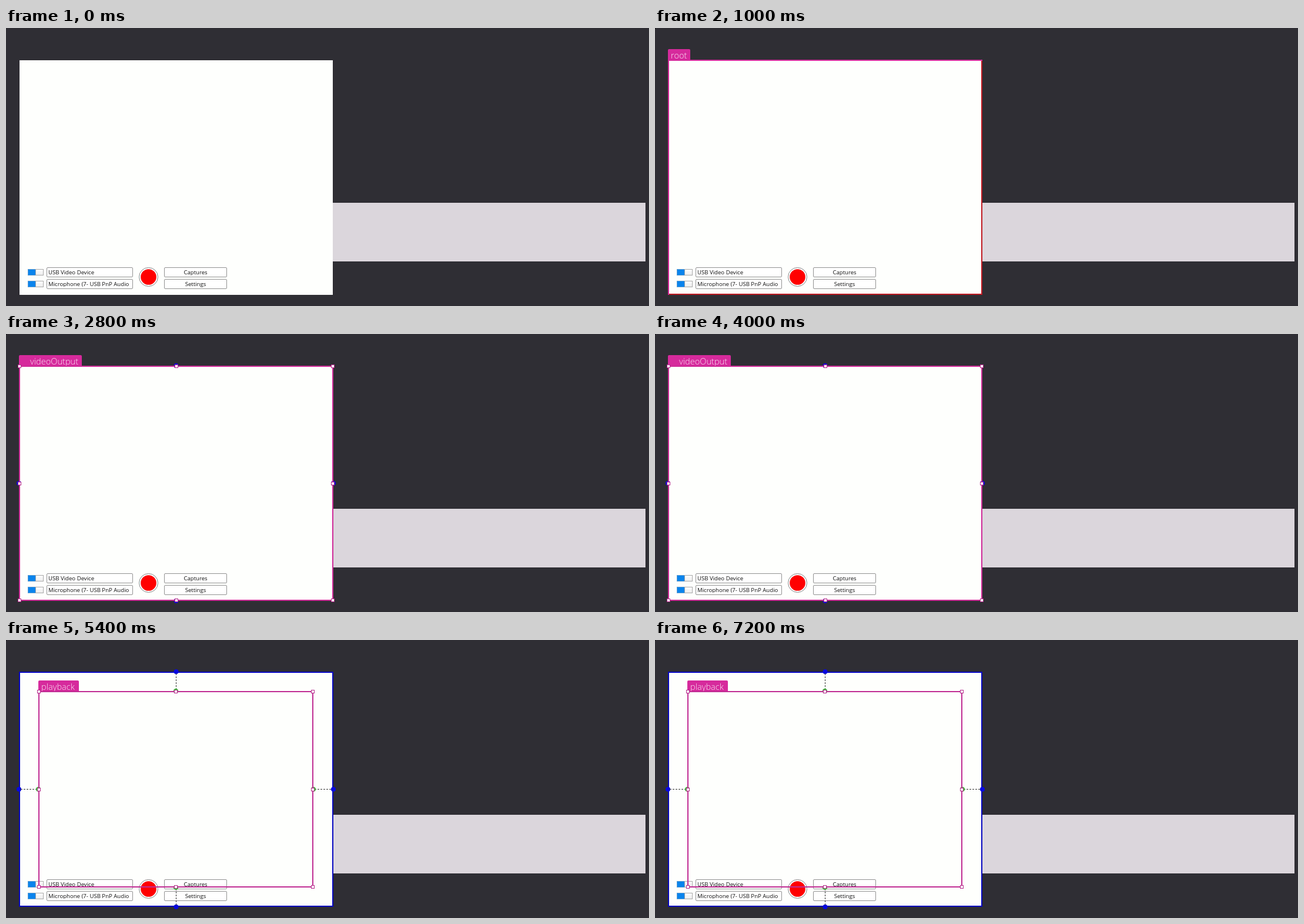
Recreate the animation shown at these times as an HTML page. Size 1094x474 px, loop 8000 ms.

```html
<!DOCTYPE html>
<html lang="en">
<head>
<meta charset="utf-8">
<title>Form editor selection</title>
<style>
  html, body { margin: 0; width: 100%; height: 100%; overflow: hidden; background: #2f2e34; }
  svg { display: block; width: 1094px; height: 474px; font-family: "Open Sans", "Noto Sans", sans-serif; }
  .ui { font-size: 9.6px; fill: #111; }
  .tag { font-size: 14.6px; font-weight: 300; fill: #fbe3f4; }
</style>
</head>
<body>
<svg id="stage" viewBox="0 0 1094 474">
  <defs>
    <linearGradient id="thumb" x2="0" y2="1">
      <stop stop-color="#fff"/><stop offset="1" stop-color="#ececec"/>
    </linearGradient>
  </defs>
</svg>
<script>
const LOOP = 8000, PINK = '#d62a9c', BLUE = '#0808e0';
const stage = document.getElementById('stage');

function add(parent, tag, attrs, text) {
  const node = document.createElementNS('http://www.w3.org/2000/svg', tag);
  for (const key in attrs) node.setAttribute(key, attrs[key]);
  if (text) node.textContent = text;
  parent.append(node);
  return node;
}
const group = () => add(stage, 'g', {});
const rect = (g, x, y, width, height, fill, more) =>
  add(g, 'rect', { x, y, width, height, fill, ...more });
const dot = (g, cx, cy, r, fill, more) => add(g, 'circle', { cx, cy, r, fill, ...more });
const path = (g, d, stroke, width, more) =>
  add(g, 'path', { d, stroke, 'stroke-width': width, fill: 'none', ...more });
const outline = (g, b, color) =>
  rect(g, b.x, b.y, b.w, b.h, 'none', { stroke: color, 'stroke-width': 2 });

function button(g, x, y, w, label, centered) {
  rect(g, x + .5, y + .5, w - 1, 16, '#fff', { rx: 1.5, stroke: '#929292' });
  add(g, 'text', {
    class: 'ui', x: centered ? x + w / 2 : x + 3, y: y + 12.3,
    'text-anchor': centered ? 'middle' : 'start'
  }, label);
  // The field cuts off descenders of its left-aligned text.
  if (!centered) rect(g, x + 2, y + 13, w - 4, 3, '#fff');
}

function toggle(g, y) {
  rect(g, 37.5, y + .5, 26, 10, '#0a84ec', { stroke: '#5c9bd0' });
  rect(g, 50.5, y + .5, 13, 10, 'url(#thumb)', { stroke: '#a9a9a9' });
}

function tag(g, x, y, w, label, inset) {
  path(g, `M${x} ${y + 19}v-17q0-2 2-2h${w - 4}q2 0 2 2v17z`, 'none', 0, { fill: PINK });
  add(g, 'text', { class: 'tag', x: x + inset, y: y + 15.6 }, label);
}

const middles = b => [
  [b.x + b.w / 2, b.y, 0, -1], [b.x + b.w, b.y + b.h / 2, 1, 0],
  [b.x + b.w / 2, b.y + b.h, 0, 1], [b.x, b.y + b.h / 2, -1, 0]
];

function handles(g, b) {
  const corners = [[b.x, b.y], [b.x + b.w, b.y], [b.x, b.y + b.h], [b.x + b.w, b.y + b.h]];
  for (const [x, y] of [...corners, ...middles(b)])
    rect(g, Math.round(x) - 2.5, Math.round(y) - 2.5, 5, 5, '#fff', { stroke: '#b52a8c' });
}

const anchors = (g, b, color, r) => {
  for (const [x, y, dx, dy] of middles(b)) dot(g, x + dx, y + dy, r, color);
};

const form = { x: 23, y: 55, w: 533, h: 399 };
const inner = { x: 56, y: 88, w: 466, h: 333 };

const base = group();
rect(base, 556, 298, 532, 100, '#dbd6dc');
rect(base, 23, 55, 533, 400, '#fefffd');
toggle(base, 411);
toggle(base, 431);
button(base, 69, 408, 147, 'USB Video Device');
button(base, 69, 428, 147, 'Microphone (7- USB PnP Audio');
button(base, 269, 408, 107, 'Captures', true);
button(base, 269, 428, 107, 'Settings', true);
dot(base, 242.5, 424.5, 16, '#fff', { stroke: '#858585' });
dot(base, 242.5, 424.5, 13.3, '#f00');

const corner = group();
rect(corner, 0, 0, 1, 1, '#000');

const root = group();
tag(root, 22, 36, 38, 'root', 5);
path(root, 'M23 455V55H557', PINK, 2);
path(root, 'M556 56V454H24', '#c01a22', 2);

const video = group();
tag(video, 22, 36, 107, 'videoOutput', 19);
anchors(video, form, BLUE, 4);
outline(video, form, '#cf2c98');
handles(video, form);

const playback = group();
outline(playback, form, '#0808c0');
anchors(playback, form, BLUE, 4);
path(playback, 'M289.5 57V86M289.5 424V452M25 254.5H54M525 254.5H554', '#333', 1,
  { 'stroke-dasharray': '3 2' });
tag(playback, 55, 69, 69, 'playback', 5);
anchors(playback, inner, '#35c435', 4);
outline(playback, inner, '#c02d93');
handles(playback, inner);

const schedule = [
  [corner, 400, LOOP], [root, 1000, 2800], [video, 2800, 5400], [playback, 5400, LOOP]
];

function draw(now) {
  const t = now % LOOP;
  for (const [g, from, to] of schedule)
    g.style.display = t >= from && t < to ? '' : 'none';
  requestAnimationFrame(() => draw(performance.now()));
}
draw(0);
</script>
</body>
</html>
```
